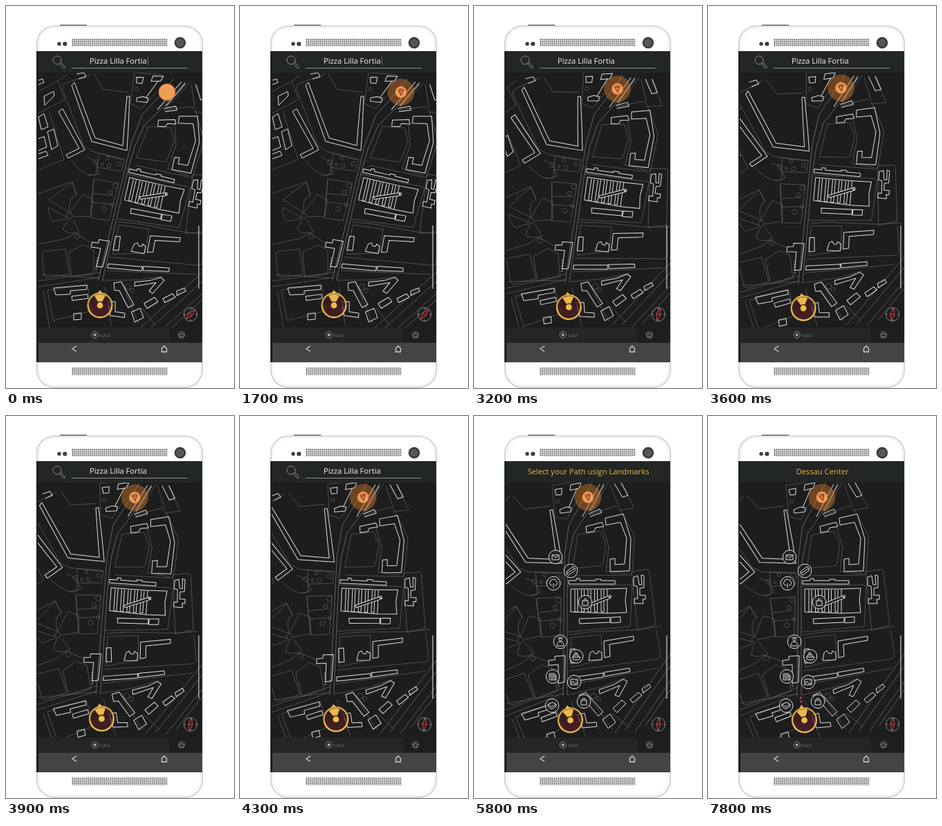
An HTML page that plays this animation: 330x550 px, repeating every 8000 ms.

```html
<!DOCTYPE html>
<html lang="en">
<head>
<meta charset="utf-8">
<title>Map navigation</title>
<style>
  html, body { margin: 0; width: 100%; height: 100%; overflow: hidden; background: #fff; }
  svg { display: block; width: 330px; height: 550px; font-family: "Open Sans", "Noto Sans", sans-serif; }
  .thin, .bold, .line { fill: none; stroke-linejoin: round; }
  .thin { stroke: #666; stroke-width: .65; }
  .bold { stroke: #dedede; stroke-width: 1; }
  .line { stroke: #8c8c8c; }
  .title { font-size: 11.2px; }
</style>
</head>
<body>
<svg viewBox="0 0 330 550">
  <defs>
    <pattern id="grille" x="95" y="47" width="2.9" height="2.75" patternUnits="userSpaceOnUse">
      <circle cx="1.4" cy="1.3" r="1" fill="#484848"/>
    </pattern>
    <clipPath id="screen"><path d="M46 96H284V463H46z"/></clipPath>
  </defs>

  <!-- phone body -->
  <path d="M78 28H117" stroke="#3c3c3c" stroke-width="2.2"/>
  <rect x="44.8" y="29" width="239.4" height="520" rx="25" fill="#fff" stroke="#d6d6d6" stroke-width="2.2"/>
  <rect x="47.5" y="31.5" width="234" height="515" rx="23" fill="none" stroke="#ececec"/>
  <path d="M95 47H233.5V58.2H95z M95 520.5H233.5V531.7H95z" fill="url(#grille)"/>
  <g fill="#3e3e3e">
    <circle cx="77" cy="54.5" r="2.7"/><circle cx="85.3" cy="54.5" r="3.1"/>
    <circle cx="252" cy="53" r="8.3"/>
  </g>
  <circle cx="252" cy="53" r="4.5" fill="#555" stroke="#6c6c6c"/>
  <path d="M44 65H284V513H44z" fill="#1d1d1d"/>

  <g clip-path="url(#screen)">
    <g id="map">
      <!-- west side and railway -->
      <g class="thin">
        <path d="M84 112L123 98M84 112q-4 3-2 8l30 80 12 9 46 13M128 98l12 22 37 4"/>
        <path d="M47 123l28-15 13-9M75 108l10 27-38 19M47 236l37-15M84 221l-22-70"/>
        <path d="M95 222c10 14 22 24 35 21l5-31 37 9-5 17-36-6M118 217l12 7 5 18-16 2"/>
        <path d="M47 270l49-17 6 19M62 279l34-25 6 18q-12 2-10 25zM92 298l20-27 14 8-3 24H97"/>
        <path d="M88 304l-27-14q0 12 7 20l20-4M90 307l-8 15q8 7 24 4l-9-19M127 249l36 6-14 54-27-4z"/>
        <path d="M127 250l-3 32 31 4M126 270l30 3M47 343l39-8 15-8 22 14"/>
        <path d="M52 358q0-4 4-5l30-3 6 36-31 5q-5 0-6-5zM91 354l22-10 14 8v34l-33 4z"/>
        <path d="M47 404l88-13M47 396l90-13M54 410l9 53M60 409l58-8 6 38-56 14z"/>
        <path d="M195 463L335 338M210 463L335 351M224 468L335 368M240 463L335 377" stroke-width=".8"/>
        <circle cx="92" cy="302" r="4"/><circle cx="103" cy="332" r="3.5"/>
        <circle cx="130" cy="225" r="3.5"/><circle cx="139" cy="228" r="2"/><circle cx="147" cy="219" r="2.5"/>
        <circle cx="149" cy="230" r="3"/><circle cx="164" cy="227" r="3"/><circle cx="158" cy="259" r="3.5"/>
        <circle cx="151" cy="268" r="3"/><circle cx="154" cy="286" r="2.5"/><circle cx="142" cy="292" r="3.5"/>
        <path d="M133 362l-3 20" stroke-width="3" stroke-dasharray="2 2"/>
      </g>
      <g class="bold">
        <path d="M99 110l21 56 9 24 40 11 2-26 4-45h4l-2 47-2 31-51-13-29-81z"/>
        <path d="M76 152l6-4 32 59-24 12-3-5 19-9z"/>
        <path d="M55 130l14-7 1 6-14 14zM47 107l6-2 2 5-8 3M47 160l8-5 6 19-10 4zM60 181l9-4 6 24-9 6zM47 191l8-3 4 15-12 5"/>
        <path d="M102 98l11-2 3 6-11 3M47 213l11-4 3 6-14 5"/>
        <path d="M69 406l48-4v6l-24 2v5l-21 1zM95 418l23-3 1 6-23 3zM98 443l11-1v9l-11 1z"/>
      </g>

      <!-- main road and east side, laid out north up -->
      <g transform="translate(136 431) rotate(13) translate(-139.5 -438)">
        <g class="thin">
          <path d="M170 96L152 131 137 158 131 202 129 404M188 96L164 140 144 170 137 205 135 240V402" stroke="#858585"/>
          <path d="M194 96l-25 44M113 100l40-6M113 100l4 45 17 4 16-28"/>
          <path d="M166 143l37-13q5-1 8 4l20 36q2 4 1 9l-3 46q-1 4-6 4l-79 1M197 99l12 30M212 96l20 36-22 4"/>
          <path d="M150 171l32-5 9 18-4 28q-1 4-5 4l-39 3zM186 160l9 28-4 36 32 3"/>
          <path d="M135 245l90-2q4 0 4 4l-3 56-90 8M228 224l22-3q4 0 4 4l9 76-26 8z"/>
          <path d="M138 315l30-4 64-3 38-5M140 319l44-4 2 35-45 12zM138 367l126-17q6-1 6-7l-6-35"/>
          <path d="M138 387l128-24M129 400l-82 14M135 402l50-12 34-13M140 410l22 52M162 398l38 53M200 428l24 20"/>
          <circle cx="121" cy="123" r="2.7"/>
          <circle cx="173" cy="403" r="4"/><circle cx="180" cy="407" r="3"/>
        </g>
        <g class="bold">
          <path d="M117 106l10-2v9l-8 1zM140 99l15-3-3 8-13 3zM124 135l9-4 8 1-1 6-15 2z"/>
          <path d="M162 159l23-6 3 6-12 2-2 5-11 2zM166 141l16-7 3 5-17 6M203 97l12 20 8-3-10-18"/>
          <path d="M190 147l26-6 11 36-2 46-28 1v-18l7-1v9l14-1 3-37-9-23-21 4z"/>
          <path d="M149 104l-12 28M182 98l-25 47M188 99l-20 38"/>
          <path d="M137 237h11v-3h5v3h23v-2h8v2h20v5H137z"/>
          <path d="M140 249h53l28-1-2 17 2 18-28 1-53-2zM193 249v35"/>
          <path id="slats"/>
          <path d="M160 273l35-14 3 3-36 14z" fill="#1d1d1d"/>
          <circle cx="197" cy="260" r="1.8"/>
          <path d="M152 292l45-2v7l-44 2zM198 290l14-1v8l-14 1z"/>
          <path d="M231 232l6-2 2 13h4l-1-14 4 1v17l-6 1v10h8v6h-4l1 6h-13v-7h5l-1-18-5-1z"/>
          <path d="M188 324l43-7v6l-35 6 1 17-8 2zM139 336l7-1 2 20-8 1z"/>
          <path d="M168 341l4-3 3 4h4l1-4 5 3v10l-19 1z"/>
          <path d="M117 346l15-1-1 38-9 2v-27l-14 1v-7l9-1z"/>
          <path d="M138 377l49-7v6l-49 7zM188 369l37-6 1 5-37 7z"/>
          <path d="M181 394l21-7 14-8 6 3-12 22-6-2 7-14-29 12zM152 402l10-4 25 28-7 6-18-21-7 1z"/>
          <path d="M201 421l13-12 6 5-13 13zM226 408l12-10 5 4-13 11zM243 393l10-7 3 4-11 9z"/>
          <path d="M186 437l11-8 8 12-11 9zM150 430l10-2 3 14 14-1 1 6-21 2z"/>
        </g>
      </g>
    </g>

    <g id="goal">
      <circle id="halo" fill="#d57a2c" opacity=".44"/>
      <circle id="dot" fill="#eda052" stroke="#e0583f"/>
      <path id="slice" d="M-4-3.5Q0-6 4-3.500L0 5zM-3-1.500Q0-3.500 3-1.500M-1 1h1" fill="#e9875a" stroke="#6b211d" stroke-width=".9"/>
    </g>

    <path d="M279 316V407" stroke="#cfcfcf" stroke-width="1.2"/>
    <g id="icons" class="bold" stroke-width=".8"></g>
    <path id="trail" d="M134.5 405.5v.1M135 411v.1M135.7 417v.1" stroke="#d63440" stroke-width="3.2" stroke-linecap="round"/>

    <g id="player">
      <circle r="17.3" fill="#521f26" fill-opacity=".68" stroke="#e9b84e" stroke-width="2.4"/>
      <path d="M-17 0A17 17 0 0 1 17 0z" fill="#2a1c19" opacity=".4"/>
      <path d="M-4-17L0-22 4-17zM-8-14Q0-18 8-14L3-5Q0-6.500-3-5z" fill="#e9b84e"/>
      <circle r="4.400" fill="#f0bd50"/>
    </g>

    <g transform="translate(267 444)">
      <circle r="9.700" class="line" stroke-width=".9"/>
      <path d="M0-10v3M0 10v-3M-10 0h3M10 0h-3" class="line"/>
      <path id="needle" d="M0-9L3 0 0 9-3 0zM-3 0H3" fill="#2c1719" stroke="#e05055" stroke-width=".9"/>
    </g>
  </g>

  <!-- header -->
  <path d="M47 65H284V96H47z" fill="#222624"/>
  <g id="search">
    <circle cx="74" cy="78" r="6" class="line"/>
    <path d="M78 82l1.500-1 6 7-2 2-6-7z" class="line"/>
    <path d="M95 89.500H263" class="line"/>
    <text x="121" y="83" class="title" fill="#f2f2f2" textLength="">Pizza Lilla Fortia</text>
    <path id="cursor" d="M205.500 73V85" stroke="#888" stroke-width=".8"/>
  </g>
  <text id="title" x="165.500" y="83.500" class="title" fill="#e9b64c" text-anchor="middle"></text>

  <!-- tabs and system bar -->
  <path d="M47 463H284V485H47z" fill="#1d1f1e"/>
  <path d="M47 485V467q0-4 4-4H231q5 0 5 5V485z" fill="#242625"/>
  <circle cx="128.700" cy="473.500" r="4.600" class="line"/>
  <circle cx="128.700" cy="473.500" r="2" fill="#aaa"/>
  <text x="135.500" y="476.500" font-size="7" fill="#656565">NAVI</text>
  <g class="line" stroke-width=".8">
    <circle cx="254" cy="473.500" r="4.700"/>
    <path d="M254 470l1 2.500h3l-2.300 1.800 1 3-2.700-1.700-2.700 1.700 1-3-2.300-1.800h3z"/>
  </g>
  <path d="M47 485H284V513H47z" fill="#444"/>
  <path d="M102 489.500l-6 4 6 4M225.500 493l3.500-3.500 3.500 3.500v5h-7z" fill="none" stroke="#d0d0d0" stroke-width="1.300"/>
</svg>

<script>
const $ = id => document.getElementById(id);
const clamp = v => Math.max(0, Math.min(1, v));
const set = (id, name, value) => $(id).setAttribute(name, value);
const show = (id, on) => set(id, 'visibility', on ? 'visible' : 'hidden');

// Linear interpolation through [time, value] pairs
function track(t, keys) {
  if (t <= keys[0][0]) return keys[0][1];
  for (let i = 1; i < keys.length; i++) {
    const [t0, a] = keys[i - 1], [t1, b] = keys[i];
    if (t <= t1) return a + (b - a) * (t - t0) / (t1 - t0);
  }
  return keys[keys.length - 1][1];
}

let slats = '';
for (let x = 146; x < 190; x += 9.5) slats += `M${x} 250v32h4v-32`;
set('slats', 'd', slats);

const bag = 'M-4-2H4V5H-4zM-2-2q0-3 2-3t2 3';
const landmarks = [
  [118, 203, 'M-5-3H5V4H-5zL0 1 5-3'],
  [140, 223, 'M-6 1L3-6M-6 4L6-4M-3 6L6 0M-6 1q0 5 3 5M3-6q4 1 3 6'],
  [115, 241, 'M0 7V0M-2 3q-5-1-3-5 1-4 5-4t5 4q2 4-3 5'],
  [161, 268, bag],
  [125, 325, 'M-5 6q0-6 5-6t5 6zM-2-3a2 2 0 1 0 4 0 2 2 0 1 0-4 0M-4-6H4'],
  [148, 346, 'M-6 1H6L4 5H-4zM-4 1V-2H3V1M-2-2V-5H1V-2'],
  [114, 375, 'M-5-4H3V5H-5zM3-1H5V5H3M-3-2H1V1H-3zM-3 3H1'],
  [145, 383, 'M-5-4H5V4H-5zM-5 3L-2-1 1 3 3 1 5 3M2-2h1'],
  [113, 417, 'M-6-2L1-5 6-2-1 2zM-6 1L-1 5 6 1M-6-2V1M6-2V1'],
  [159, 411, bag]
];
$('icons').innerHTML = landmarks.map(([x, y, d]) =>
  `<g transform="translate(${x} ${y})"><circle r="9.8" fill="#1d1d1d" fill-opacity=".85"/><path d="${d}"/></g>`
).join('');

function draw(t) {
  const turn = track(t, [[1700, 0], [2300, .06], [2800, .16], [3600, .6], [4300, .81], [4700, 1]]);
  const angle = -13 * turn;
  const x = 136 + 3.5 * turn, y = 431 + 7 * turn;
  const pose = `translate(${x} ${y}) rotate(${angle})`;
  set('map', 'transform', `${pose} translate(-136 -431)`);
  set('goal', 'transform', `${pose} translate(97 -307)`);
  set('player', 'transform', pose);
  const needle = track(t, [[800, 45], [1700, 38], [2800, 19], [3600, 11], [4300, 8], [4700, 7]]);
  set('needle', 'transform', `rotate(${needle})`);

  const shrink = clamp(t / 300);
  set('dot', 'r', 12 - 3.8 * shrink);
  set('dot', 'stroke-opacity', 1 - .6 * shrink);
  set('halo', 'r', 8 + 11.3 * clamp((t - 800) / 900));
  show('halo', t >= 900);
  show('slice', t >= 700);

  const fade = clamp((t - 4900) / 600);
  set('search', 'opacity', 1 - fade);
  set('title', 'opacity', fade);
  $('title').textContent = t < 7800 ? 'Select your Path usign Landmarks' : 'Dessau Center';
  show('cursor', t < 1800);
  show('icons', t >= 5800);
  show('trail', t >= 7800);
}

const start = performance.now();
function frame() {
  const t = (performance.now() - start) % 8000;
  draw(Math.floor(t / 100) * 100);
  requestAnimationFrame(frame);
}
frame();
</script>
</body>
</html>
```
